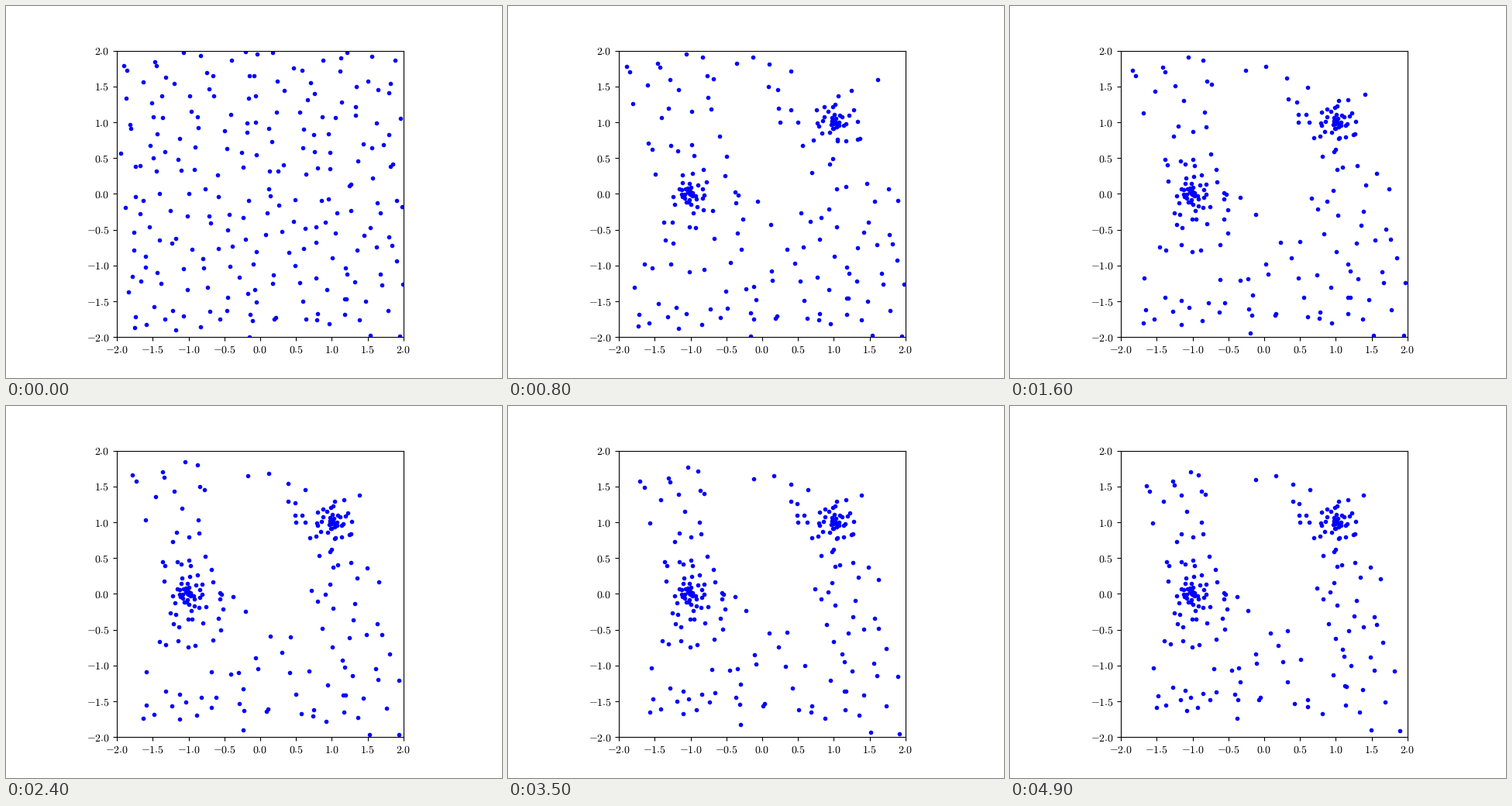
Animation of 640x480 px, one loop 5 s. Source, as a matplotlib script:

```python
import numpy as np
import matplotlib.pyplot as plt
from matplotlib.animation import FuncAnimation

FRAMES = 50
INTERVAL = 100
LIMIT = 2
CELLS = 15
CENTRES = np.array([(-1, 0), (1, 1)])

plt.rcParams["mathtext.fontset"] = "cm"
plt.rcParams["text.hinting"] = "none"
rng = np.random.default_rng(4)


def scattered_points():
    """One random point in every cell of a square grid."""
    cells = np.indices((CELLS, CELLS)).reshape(2, -1).T
    return 2 * LIMIT * (cells + rng.random(cells.shape)) / CELLS - LIMIT


starts = scattered_points()
distances = np.linalg.norm(starts[:, None] - CENTRES, axis=2)
homes = CENTRES[distances.argmin(axis=1)]
offsets = starts - homes
radii = distances.min(axis=1)[:, None]

# Near points collapse to a core; the axis term gives cross-shaped tails.
shrink = np.minimum((radii / 1.8) ** 2, 0.85)
shrink = shrink * (np.abs(offsets) / radii) ** 0.3
settle_time = 0.03 + 0.08 * radii**3


def positions(t):
    pull = 1 - np.exp(-(t / settle_time) ** 2)
    return homes + offsets * (1 + (shrink - 1) * pull)


fig, ax = plt.subplots(figsize=(6.4, 4.8), dpi=100)
ax.set_aspect("equal")
ticks = np.linspace(-LIMIT, LIMIT, 9)
labels = [f"${v:.1f}$" for v in ticks]
ax.set_xticks(ticks, labels)
ax.set_yticks(ticks, labels)
ax.set(xlim=(-LIMIT, LIMIT), ylim=(-LIMIT, LIMIT))
dots, = ax.plot([], [], "b.")


def update(frame):
    dots.set_data(*positions(frame / (FRAMES - 1)).T)
    return dots,


anim = FuncAnimation(fig, update, frames=FRAMES, interval=INTERVAL,
                     repeat=True, repeat_delay=0)
plt.show()
```
